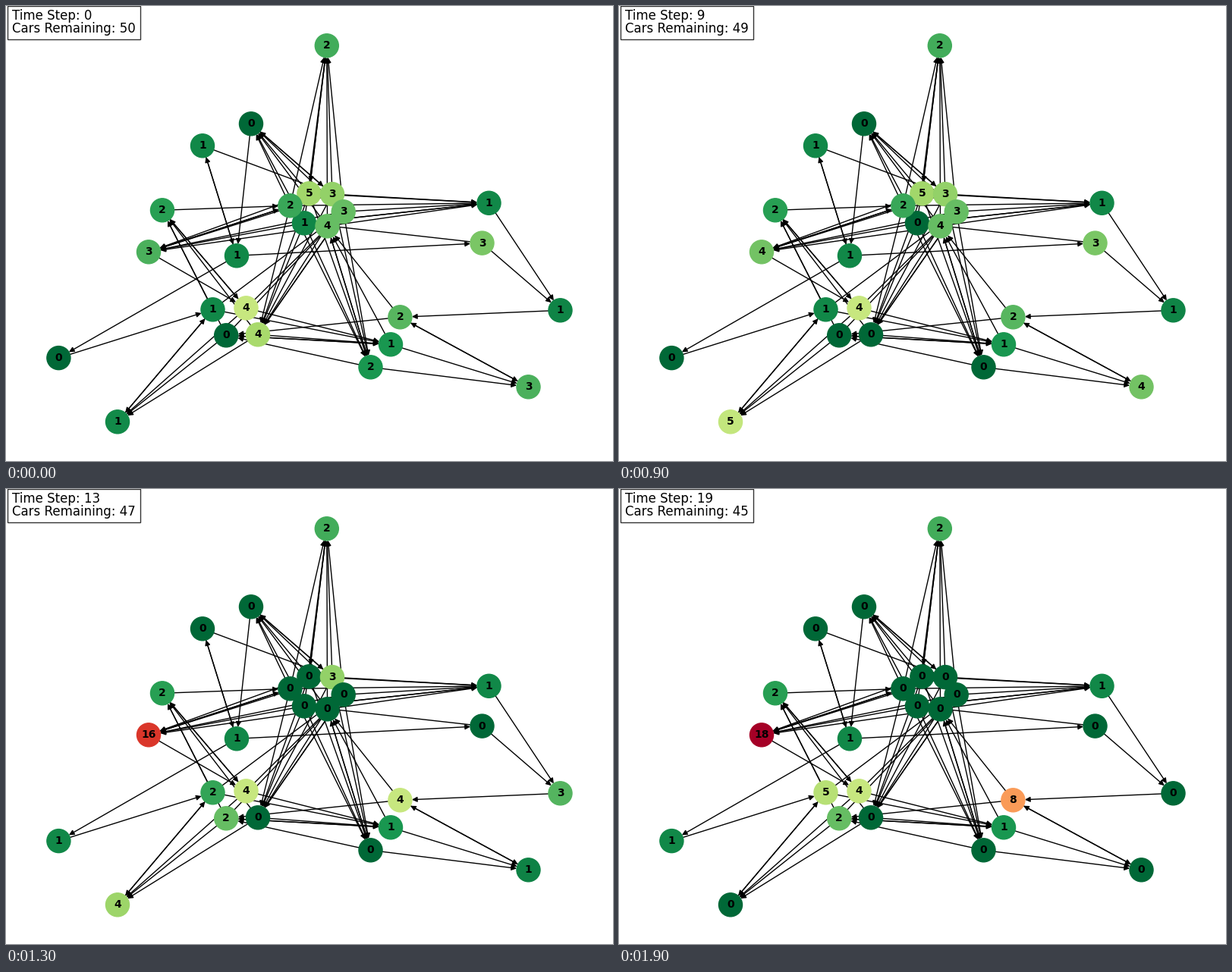
A matplotlib script for the animation above (2000 ms loop, 800 px wide and 600 px high).

```python
import matplotlib.pyplot as plt
from matplotlib.animation import FuncAnimation
from matplotlib.patches import FancyArrowPatch, Rectangle

W, H, DPI = 800, 600, 100
STEPS, STEP_MS = 20, 100
NODE_AREA = 500

# name: x, y, road capacity, cars at the start
NODES = {
    "A": (422.8, 52, 13, 2), "B": (323, 155, 15, 0), "C": (259, 184, 15, 1),
    "D": (206, 269, 17, 2), "E": (188, 324, 18, 3), "F": (304, 329, 15, 1),
    "G": (272.5, 400, 15, 1), "H": (316.5, 398, 11, 4), "I": (290.2, 434, 10, 0),
    "J": (332, 433, 13, 4), "K": (147, 548, 14, 1), "L": (69.4, 463.8, 15, 0),
    "Q": (393, 286, 16, 1), "N": (399.4, 247, 17, 5), "O": (430, 247.8, 11, 3),
    "P": (444.7, 271, 15, 3), "M": (374.4, 263, 14, 2), "R": (423.5, 290, 20, 4),
    "S": (636.5, 259.5, 15, 1), "T": (627.5, 312.3, 13, 3), "U": (730.5, 401, 17, 1),
    "V": (688.5, 502, 18, 3), "W": (519.4, 410, 11, 2), "X": (507, 446, 10, 1),
    "Y": (480.5, 476, 20, 2),
}

# groups of start nodes : their shared end nodes
ROADS = ("A:N BC:FO DE:MH F:CLT GHIJ:DKPX KL:G MNOPQR:ABESJY "
         "ST:QU UV:W WXY:IRV")

# time step: new car counts
MOVES = {
    4: dict(Q=0, E=4),
    8: dict(J=0, K=5),
    9: dict(Y=0, V=4),
    10: dict(M=0, N=0, E=11, V=1, W=5),
    11: dict(C=0, P=0, R=1, E=16, T=0, U=3, W=6, G=2, L=1, K=4),
    12: dict(W=4, I=2),
    13: dict(R=0),
    15: dict(O=0, E=18),
    18: dict(K=0, G=5, U=1, W=6),
    19: dict(U=0, V=0, W=8),
}
EXITS = (9, 11, 13, 15, 18)  # steps at which one car leaves
CARS = 50


def pos(name):
    x, y = NODES[name][:2]
    return x, y + 0.3


def counts_at(step):
    counts = {name: node[3] for name, node in NODES.items()}
    for when, change in MOVES.items():
        if when <= step:
            counts.update(change)
    return counts


fig = plt.figure(figsize=(W / DPI, H / DPI), dpi=DPI, facecolor="white")
ax = fig.add_axes([0, 0, 1, 1])
ax.set_xlim(0, W)
ax.set_ylim(H, 0)
ax.axis("off")

shrink = NODE_AREA ** 0.5 / 2
for group in ROADS.split():
    starts, ends = group.split(":")
    for start in starts:
        for end in ends:
            ax.add_patch(FancyArrowPatch(
                pos(start), pos(end), arrowstyle="-|>", mutation_scale=10,
                shrinkA=shrink, shrinkB=shrink, color="black", linewidth=1, zorder=1))

points = [pos(name) for name in NODES]
dots = ax.scatter(*zip(*points), s=NODE_AREA, c="green", linewidths=1, zorder=2)
labels = {name: ax.text(*pos(name), "", size=10, weight="bold", family="DejaVu Sans",
                        ha="center", va="center", zorder=3) for name in NODES}

ax.add_patch(Rectangle((2.4, 0.4), 174.8, 43.6, facecolor="white", edgecolor="black",
                       linewidth=1, alpha=0.8, zorder=4))
clock, remaining = [ax.text(8, y, "", size=12, family="DejaVu Sans", va="baseline", zorder=5)
                    for y in (18, 35)]
cmap = plt.get_cmap("RdYlGn_r")


def draw(step):
    counts = counts_at(step)
    colors = [cmap(counts[name] / node[2]) for name, node in NODES.items()]
    dots.set_facecolor(colors)
    dots.set_edgecolor(colors)
    for name, label in labels.items():
        label.set_text(str(counts[name]))
    left = CARS - sum(when <= step for when in EXITS)
    clock.set_text(f"Time Step: {step}")
    remaining.set_text(f"Cars Remaining: {left}")
    return [dots, clock, remaining, *labels.values()]


anim = FuncAnimation(fig, draw, frames=STEPS, interval=STEP_MS,
                     init_func=lambda: draw(0), repeat=True, repeat_delay=0)
plt.show()
```
